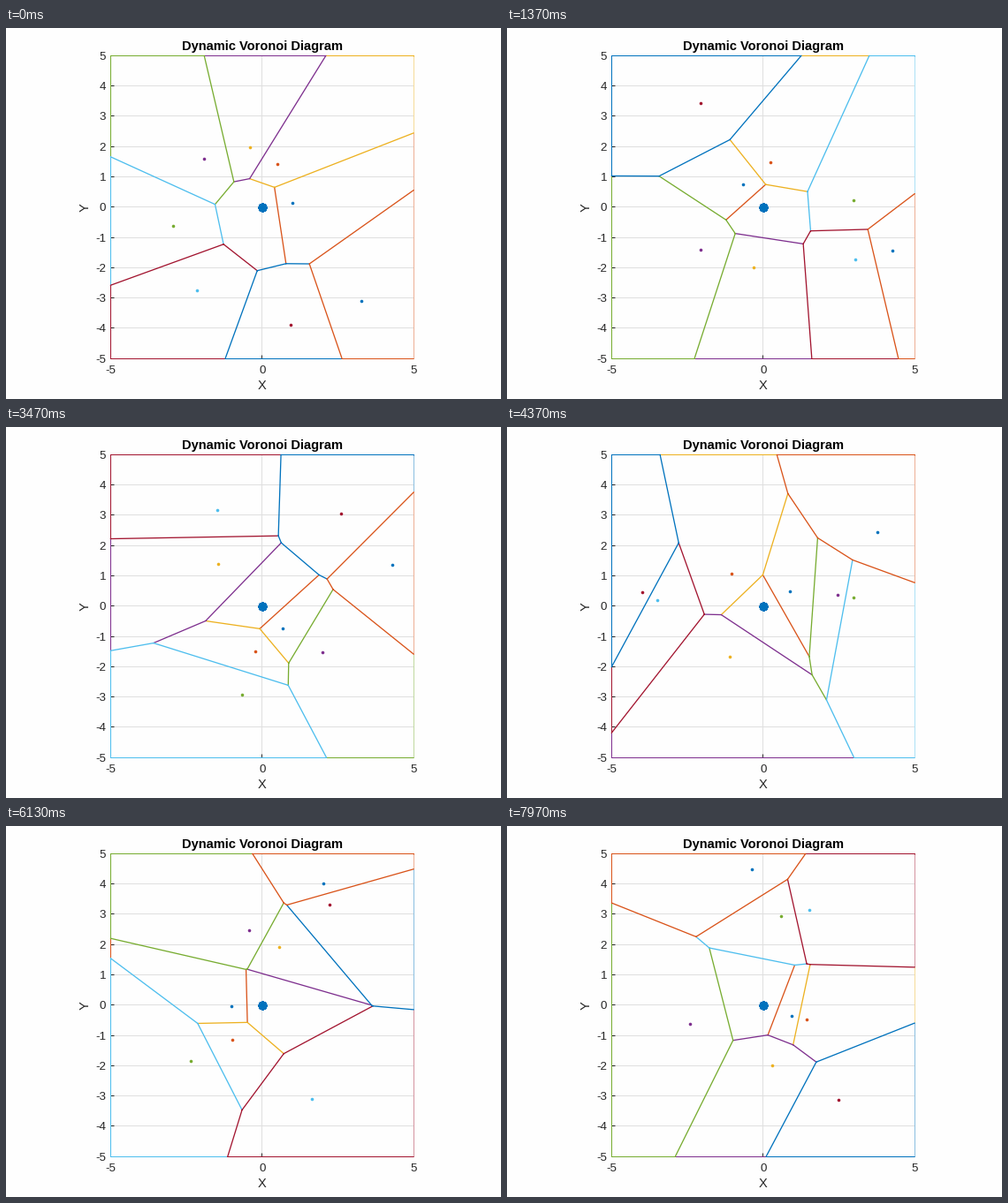
These frames come from a looping animation (560 px wide and 420 px high, 8000 ms). A matplotlib script:

```python
import numpy as np
import matplotlib
import matplotlib.pyplot as plt
from matplotlib.animation import FuncAnimation

matplotlib.rcParams["font.family"] = "Liberation Sans"

W, H, DPI = 560, 420, 100
FRAMES, TICK_MS, STEPS_PER_MS = 400, 20, 0.03
PT = 72 / DPI                       # points per pixel
CX, CY, UNIT, LIM = 289.75, 202.75, 34.3, 5
BG, GRID, INK = "#fefefe", "#dfdfdf", "#262626"
COLORS = ["#0072bd", "#d95319", "#edb120", "#7e2f8e",
          "#77ac30", "#4dbeee", "#a2142f"]

SPEED = np.array([1, 3, 1.3, 0.6, 1.4, 0.8, 1.6, 0.2])
RADIUS = 1 + 0.5 * np.arange(8)
PHASE = 2 * np.pi * np.arange(8) / 8
RIM = -1                            # tag of a cell side on the plot border


def px(x):
    return CX + UNIT * x


def py(y):
    return CY - UNIT * y


def mid(v):
    """Centre of the pixel holding v, for crisp straight lines."""
    return np.floor(v) + 0.5


def color(i):
    return COLORS[i % len(COLORS)]


def clock(frame):
    # 30 steps a second, each starting on the nearest tick
    step = int((frame * TICK_MS + 14) * STEPS_PER_MS)
    return 0.15 if step == 0 else 0.25 + 0.05 * step


def sites(t):
    a = PHASE + SPEED * t
    orbit = np.column_stack([RADIUS * np.cos(a), RADIUS * np.sin(a)])
    return np.vstack([[0, 0], orbit])


def cut(poly, normal, offset, tag):
    """Keep p . normal <= offset; each vertex carries the tag of its next side."""
    out = []
    for (p, side), (q, _) in zip(poly, poly[1:] + poly[:1]):
        dp, dq = p @ normal - offset, q @ normal - offset
        if dp <= 0:
            out.append((p, side))
        if dp * dq < 0:
            m = p + (q - p) * dp / (dp - dq)
            out.append((m, tag if dp < 0 else side))
    return out


def cell(pts, i):
    poly = [(np.array(c, float), RIM) for c in
            [(-LIM, -LIM), (LIM, -LIM), (LIM, LIM), (-LIM, LIM)]]
    for j in range(len(pts)):
        if j != i:
            normal = pts[j] - pts[i]
            poly = cut(poly, normal, normal @ (pts[i] + pts[j]) / 2, j)
    return poly


def sides(poly, keep):
    """Chosen sides of a cell as separate strokes in pixels."""
    xs, ys = [], []
    for (p, side), (q, _) in zip(poly, poly[1:] + poly[:1]):
        if keep(side):
            xs += [px(p[0]), px(q[0]), np.nan]
            ys += [py(p[1]), py(q[1]), np.nan]
    return np.array(xs), np.array(ys)


fig = plt.figure(figsize=(W / DPI, H / DPI), dpi=DPI, facecolor=BG)
ax = fig.add_axes([0, 0, 1, 1])
ax.set_xlim(0, W)
ax.set_ylim(H, 0)
ax.axis("off")


def rule(xs, ys, c, z, **kw):
    ax.plot(mid(np.array(xs)), mid(np.array(ys)), color=c, lw=PT, zorder=z,
            solid_capstyle="butt", snap=False, **kw)


def label(x, y, s, size, c=INK, **kw):
    ax.text(x, y, s, fontsize=size * PT, color=c, **kw)


def stroke(i, width, z, cap):
    return ax.plot([], [], color=color(i), lw=width * PT, zorder=z + 0.1 * i,
                   solid_capstyle=cap, snap=False)[0]


L, R, T, B = px(-LIM), px(LIM), py(LIM), py(-LIM)

for v in range(-LIM, LIM + 1):
    if abs(v) < LIM:
        rule([L, R], [py(v)] * 2, GRID, 1)
    rule([L, L + 4], [py(v)] * 2, INK, 2)
    label(113, py(v) + 4.5, str(v), 13.33, ha="right", va="baseline")
rule([px(0)] * 2, [T, B], GRID, 1)
for v in (-LIM, 0, LIM):
    rule([px(v)] * 2, [B, B - 4], INK, 2)
    label(px(v), 391, str(v), 13.33, ha="center", va="baseline")

label(290, 25, "Dynamic Voronoi Diagram", 14.67, "black",
      weight="bold", ha="center", va="baseline")
label(CX, 409, "X", 14.67, ha="center", va="baseline")
label(89.5, CY, "Y", 14.67, rotation=90, ha="center", va="center")

rims = [stroke(i, 1, 3, "projecting") for i in range(9)]
edges = [stroke(i, 1.3, 5, "round") for i in range(9)]
dots = [ax.plot([], [], "o", color=color(i), ms=3.6 * PT, mew=0,
                zorder=7)[0] for i in range(8)]
rule([R, R], [T + 1, B], BG, 4, alpha=0.55)     # the right border is faint
ax.plot([mid(CX)], [mid(CY)], marker=(8, 2, 0), ms=10.5 * PT,
        mew=2.9 * PT, color=COLORS[0], zorder=8)


def draw(frame):
    pts = sites(clock(frame))
    for i in range(len(pts)):
        poly = cell(pts, i)
        xs, ys = sides(poly, lambda side: side == RIM)
        rims[i].set_data(mid(xs), mid(ys))
        edges[i].set_data(*sides(poly, lambda side: 0 <= side < i))
    for dot, (x, y) in zip(dots, pts[1:]):
        dot.set_data([px(x)], [py(y)])
    return rims + edges + dots


anim = FuncAnimation(fig, draw, frames=FRAMES, interval=TICK_MS,
                     init_func=lambda: draw(0), repeat=True, blit=False)
plt.show()
```
